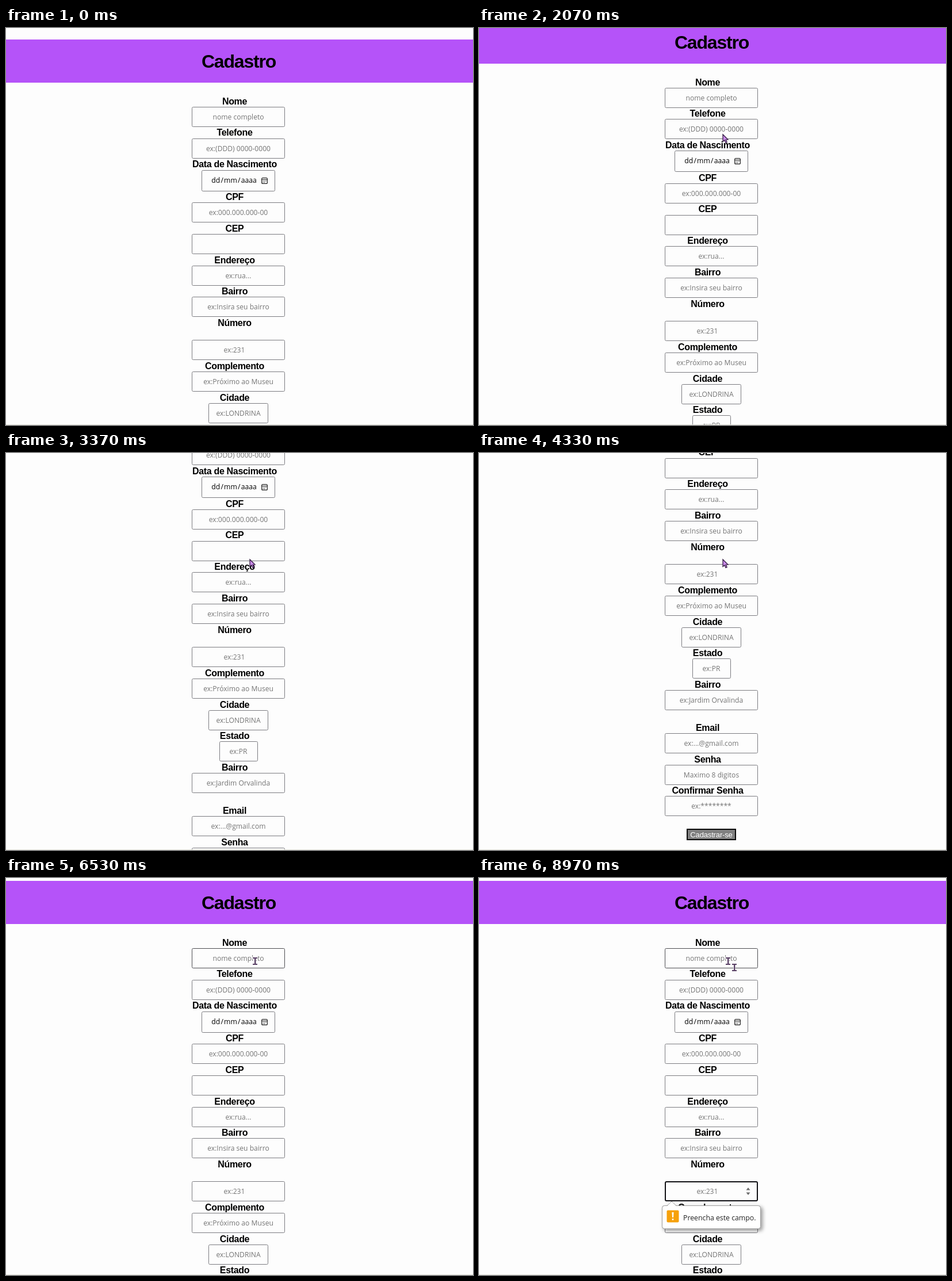
Recreate the animation shown at these times as an HTML page with a canvas. Size 812x690 px, loop 9010 ms.

```html
<!DOCTYPE html>
<html lang="pt-BR">
<head>
<meta charset="utf-8">
<title>Cadastro</title>
<style>
html, body { margin: 0; width: 100%; height: 100%; overflow: hidden; background: #fdfdfd; }
canvas { display: block; }
</style>
</head>
<body>
<canvas id="stage" width="812" height="690"></canvas>
<script>
const ctx = document.getElementById('stage').getContext('2d');
const LOOP = 9010, W = 812, H = 690, MID = 404, LABEL_X = 397.5;
const SANS = '"Liberation Sans", Arial, sans-serif';
const HUMAN = '"Open Sans", "Noto Sans", sans-serif';
const HINT = '#757575', BORDER = '#7b7b80';

// label, label middle, input top, placeholder, input width
const fields = [
  ['Nome', 127, 137, 'nome completo'],
  ['Telefone', 181.3, 191.5, 'ex:(DDD) 0000-0000'],
  ['Data de Nascimento', 236.3, 246.5, null, 128],
  ['CPF', 293, 303, 'ex:000.000.000-00'],
  ['CEP', 347.5, 358, ''],
  ['Endereço', 402.5, 412.5, 'ex:rua...'],
  ['Bairro', 457, 467, 'ex:Insira seu bairro'],
  ['Número', 512, 542.3, 'ex:231'],
  ['Complemento', 587, 597, 'ex:Próximo ao Museu'],
  ['Cidade', 642, 652, 'ex:LONDRINA', 104],
  ['Estado', 696.3, 706.5, 'ex:PR', 67],
  ['Bairro', 751.5, 761.5, 'ex:Jardim Orvalinda'],
  ['Email', 826, 836.3, 'ex:...@gmail.com'],
  ['Senha', 881, 891.3, 'Maximo 8 digitos'],
  ['Confirmar Senha', 935.5, 945.8, 'ex:********']
];

const scrollKeys = [[1820, 0], [2070, 33], [3370, 205], [4260, 349.5], [4450, 349.5],
  [5100, 143], [5400, 55], [5620, 22], [5800, 15]];
const mouseKeys = [[60, 814, 660], [300, 700, 400], [520, 520, 14], [900, 424, 185],
  [5900, 424, 185], [6300, 433, 144], [6650, 433, 144], [6900, 444, 155]];
const POPUP_AT = 8640;

function along(keys, t, i = 1) {
  if (t <= keys[0][0]) return keys[0][i];
  for (let k = 1; k < keys.length; k++) {
    const a = keys[k - 1], b = keys[k];
    if (t < b[0]) return a[i] + (b[i] - a[i]) * (t - a[0]) / (b[0] - a[0]);
  }
  return keys[keys.length - 1][i];
}

function text(s, x, y, font, color, spacing = 0, align = 'center') {
  ctx.font = font;
  ctx.fillStyle = color;
  ctx.textAlign = align;
  ctx.letterSpacing = spacing + 'px';
  ctx.fillText(s, x, y);
}

function box(x, y, w, h, r, fill, stroke, line = 1) {
  ctx.beginPath();
  ctx.roundRect(x + line / 2, y + line / 2, w - line, h - line, r);
  if (fill) { ctx.fillStyle = fill; ctx.fill(); }
  if (stroke) { ctx.strokeStyle = stroke; ctx.lineWidth = line; ctx.stroke(); }
}

function poly(points, fill, stroke) {
  ctx.beginPath();
  points.forEach(([x, y]) => ctx.lineTo(x, y));
  ctx.closePath();
  if (fill) { ctx.fillStyle = fill; ctx.fill(); }
  if (stroke) { ctx.strokeStyle = stroke; ctx.lineWidth = 1.2; ctx.stroke(); }
}

function calendar(x, y) {
  box(x, y, 11, 11, 2, null, '#222', 1.2);
  ctx.fillStyle = '#222';
  ctx.fillRect(x + 1, y + 3, 9, 1);
  for (let i = 0; i < 5; i++) ctx.fillRect(x + 2.5 + (i % 3) * 2.5, y + 5.3 + (i > 2 ? 2.3 : 0), 1.2, 1.2);
}

function spinner(x, y) {
  poly([[x - 3.5, y - 2], [x + 3.5, y - 2], [x, y - 6.5]], '#6b6b6b');
  poly([[x - 3.5, y + 2], [x + 3.5, y + 2], [x, y + 6.5]], '#6b6b6b');
}

function field([label, mid, top, hint, w = 162], scroll, hover, focus) {
  const y = Math.round(top - scroll), h = hint === null ? 37 : 35;
  if (y > H + 30 || y < -60) return;
  text(label, LABEL_X, Math.round(mid - scroll) + 6, 'bold 16px ' + SANS, '#000', -0.33);
  const x = Math.round(MID - w / 2);
  if (focus) box(x, y, w, h, 2, '#fdfdfd', '#101014', 2);
  else box(x, y, w, h, 2, '#fdfdfd', hover ? '#4c4c50' : BORDER);
  if (hint === null) {
    text('dd\u200a/\u200amm\u200a/\u200aaaaa', 396.5, y + 22, '12.2px ' + HUMAN, '#000');
    calendar(444, y + 13);
  } else {
    const left = label === 'Número' ? 7 : 0;
    text(hint, MID - left, y + 21.5, '12.1px ' + HUMAN, HINT);
  }
  if (focus) spinner(468, y + 17.5);
}

function submitButton(y) {
  ctx.fillStyle = '#808080';
  ctx.fillRect(361, y, 86, 20);
  ctx.strokeStyle = '#0a0a0a';
  ctx.lineWidth = 2;
  ctx.strokeRect(362, y + 1, 84, 18);
  text('Cadastrar-se', MID, y + 14.5, '13px ' + SANS, '#fff', -0.15);
}

function popup() {
  ctx.save();
  ctx.shadowColor = 'rgba(0,0,0,.38)';
  ctx.shadowBlur = 6;
  ctx.shadowOffsetX = ctx.shadowOffsetY = 3;
  box(318, 569, 172, 41, 4, '#fff', '#a0a0a0');
  ctx.restore();
  box(318, 569, 172, 41, 4, '#fff', '#a0a0a0');
  poly([[327, 570.5], [335, 562.5], [343, 570.5]], '#fff');
  ctx.beginPath();
  ctx.moveTo(327, 569.5);
  ctx.lineTo(335, 562);
  ctx.lineTo(343, 569.5);
  ctx.strokeStyle = '#a0a0a0';
  ctx.lineWidth = 1;
  ctx.stroke();
  box(326, 577, 22, 22, 2, '#f6a10c');
  ctx.fillStyle = '#fff';
  poly([[335.4, 581], [338.6, 581], [338, 590], [336, 590]], '#fff');
  ctx.fillRect(335.7, 592, 2.6, 2.6);
  text('Preencha este campo.', 355, 594.5, '12.3px ' + HUMAN, '#222', 0, 'left');
}

function arrow(x, y) {
  poly([[0, 0], [0, 12.5], [2.9, 10], [5, 14.5], [7.2, 13.4], [5.2, 9.2], [9, 9]]
    .map(([a, b]) => [x + a, y + b]), '#c98be8', '#2a1238');
}

function beam(x, y) {
  const part = (dx, dy, w, h) => ctx.fillRect(x + dx, y + dy, w, h);
  ctx.fillStyle = 'rgba(255,255,255,.8)';
  part(-5, -7, 10, 4);
  part(-5, 4, 10, 4);
  part(-2, -6, 4, 13);
  ctx.fillStyle = '#5a4166';
  part(-4, -6, 8, 2);
  part(-4, 5, 8, 2);
  part(-1, -6, 2.4, 12);
}

function draw(t) {
  const scroll = along(scrollKeys, t), asked = t >= POPUP_AT;
  const mx = along(mouseKeys, t), my = along(mouseKeys, t, 2);
  const typing = t > 5900 && my < 157;

  ctx.fillStyle = '#fdfdfd';
  ctx.fillRect(0, 0, W, H);
  ctx.fillStyle = '#b553f9';
  ctx.fillRect(0, Math.round(20 - scroll), W, 75);
  text('Cadastro', MID + 0.5, Math.round(69 - scroll), 'bold 32px ' + SANS, '#000', -1.2);

  fields.forEach((f, i) => field(f, scroll, i === 0 && typing, i === 7 && asked));
  submitButton(Math.round(1002.5 - scroll));
  ctx.fillStyle = '#e6e6dc';
  ctx.fillRect(0, 689, W, 1);
  if (asked) popup();

  if (typing) {
    if (t > 6300) beam(433, 144);
    beam(mx, my);
  } else if (t > 60) arrow(mx, my);
}

const start = performance.now();
function tick() {
  draw((performance.now() - start) % LOOP);
  requestAnimationFrame(tick);
}
draw(0);
requestAnimationFrame(tick);
</script>
</body>
</html>
```
